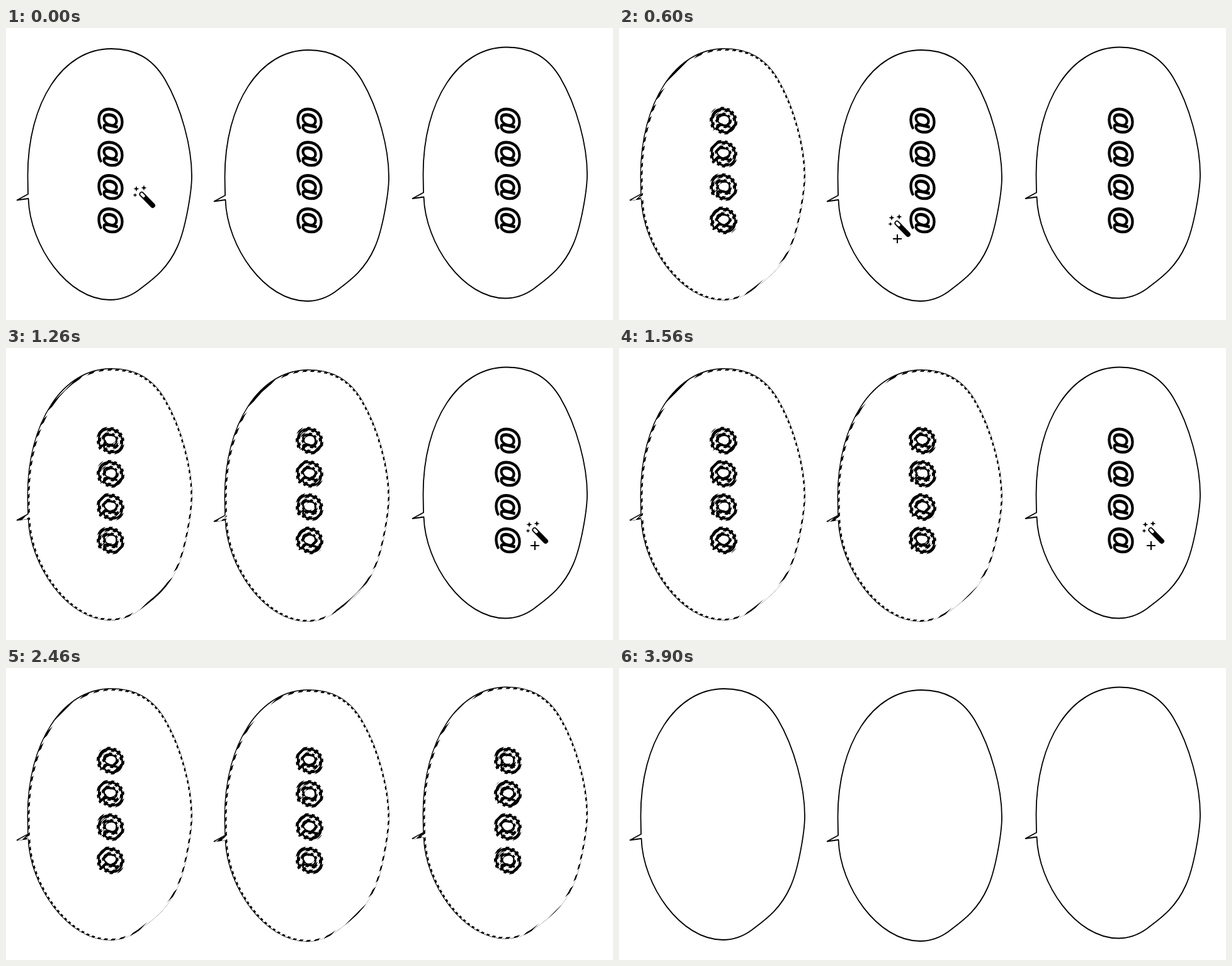
Recreate the animation shown at these times as an HTML page with a canvas. Size 964 by 464 pixels, loop 3.96 s.

```html
<!DOCTYPE html>
<html lang="en">
<head>
<meta charset="utf-8">
<title>Magic wand selection</title>
<style>
html, body { margin: 0; width: 100%; height: 100%; overflow: hidden; background: #fff; }
canvas { display: block; width: 964px; height: 464px; }
</style>
</head>
<body>
<canvas id="stage" width="964" height="464"></canvas>
<script>
const ctx = document.getElementById('stage').getContext('2d');
const LOOP = 3960, STEP = 60;
const FREEZE = 2880, DESELECT = 3060, CLEAR = 3300;
const PERIOD = 12, SPEED = 1.5, PHASE = 4;

const outline = new Path2D('M35 264L34.5 235C34.5 118 90 33 167 33' +
  'C205 33 232 48 252 81C279 127 295 190 295 235C295 260 285 320 272 348' +
  'C256 384 232 400 210 417C196 427 182 432 165 432' +
  'C98 432 38 346 35.5 271L17.5 273.5Z');

// Offset of each bubble and the time it gets selected
const bubbles = [
  { x: 0, y: 0, select: 240 },
  { x: 313, y: 2, select: 1200 },
  { x: 628, y: -2.5, select: 1740 }
];

// Wand stops; power shapes the ease-out towards the next stop
const selecting = [
  { t: 0, x: 202, y: 250, power: 1 },
  { t: 600, x: 428, y: 296, power: 1 },
  { t: 960, x: 519, y: 286, power: 6 },
  { t: 1560, x: 831, y: 275, power: 1 },
  { t: 1980, x: 897, y: 268 }
];
const leaving = [
  { t: 3180, x: 470, y: 406, power: 1 },
  { t: 3480, x: 606, y: 319, power: 1 },
  { t: 3720, x: 606, y: 319, power: 1 },
  { t: 3900, x: 857, y: 245 }
];

function makeStripes() {
  const tile = document.createElement('canvas');
  tile.width = tile.height = PERIOD;
  const c = tile.getContext('2d');
  for (let y = 0; y < PERIOD; y++) {
    for (let x = 0; x < PERIOD; x++) {
      c.fillStyle = (x + y + PHASE) % PERIOD < PERIOD / 2 ? '#000' : '#fff';
      c.fillRect(x, y, 1, 1);
    }
  }
  return ctx.createPattern(tile, 'repeat');
}
const ants = makeStripes();

// The stripes stay fixed to the stage while shapes are moved
function useAnts(step) {
  const shift = Math.round(step * SPEED) % PERIOD;
  ants.setTransform(ctx.getTransform().inverse().translate(shift, 0));
  ctx.strokeStyle = ants;
}

function drawBubble(b, selected, step) {
  ctx.save();
  ctx.translate(b.x, b.y);
  ctx.lineJoin = 'round';
  ctx.strokeStyle = '#000';
  ctx.lineWidth = 1.8;
  ctx.stroke(outline);
  if (selected) {
    ctx.translate(0.7, 0.5);
    ctx.clip(outline);
    useAnts(step);
    ctx.lineWidth = 4.4;
    ctx.stroke(outline);
  }
  ctx.restore();
}

// A vertical-writing sign: the glyph lies on its side, centred on x, y
function drawSign(x, y, selected, step) {
  ctx.save();
  ctx.translate(x, y);
  ctx.save();
  if (selected) {
    const ring = new Path2D();
    ring.rect(-40, -40, 80, 80);
    ring.ellipse(0.5, -1, 8, 6, -0.2, 0, Math.PI * 2);
    ctx.clip(ring, 'evenodd');
  }
  ctx.rotate(Math.PI / 2);
  ctx.font = '47px "Liberation Sans", Arial, sans-serif';
  ctx.lineJoin = 'round';
  const m = ctx.measureText('@');
  const gx = (m.actualBoundingBoxLeft - m.actualBoundingBoxRight) / 2;
  const gy = (m.actualBoundingBoxAscent - m.actualBoundingBoxDescent) / 2;
  ctx.strokeStyle = ctx.fillStyle = '#000';
  if (selected) useAnts(step);
  ctx.lineWidth = selected ? 4 : 1.4;
  ctx.strokeText('@', gx, gy);
  ctx.fillText('@', gx, gy);
  ctx.restore();
  ctx.restore();
}

function star(x, y, r) {
  ctx.beginPath();
  for (let i = 0; i < 8; i++) {
    const a = i * Math.PI / 4, d = i % 2 ? r * 0.36 : r;
    ctx.lineTo(x + d * Math.cos(a), y + d * Math.sin(a));
  }
  ctx.fill();
}

function line(x1, y1, x2, y2, color, width) {
  ctx.strokeStyle = color;
  ctx.lineWidth = width;
  ctx.beginPath();
  ctx.moveTo(x1, y1);
  ctx.lineTo(x2, y2);
  ctx.stroke();
}

function drawWand({ x, y }, cross) {
  ctx.save();
  ctx.translate(Math.round(x), Math.round(y));
  ctx.fillStyle = '#000';
  star(5, 5.5, 4.5);
  star(17, 4, 4.5);
  star(3, 15.5, 3.5);
  ctx.lineCap = 'round';
  line(13.5, 14, 31, 32, '#000', 8);
  line(13.5, 14, 16.5, 17, '#fff', 4.5);
  ctx.lineCap = 'butt';
  if (cross) {
    line(7, 39, 21, 39, '#000', 2);
    line(14, 32, 14, 46, '#000', 2);
  }
  ctx.restore();
}

function along(stops, t) {
  const i = stops.findIndex(s => s.t > t);
  if (i < 1) return null;
  const a = stops[i - 1], b = stops[i];
  const k = 1 - (1 - (t - a.t) / (b.t - a.t)) ** a.power;
  return { x: a.x + (b.x - a.x) * k, y: a.y + (b.y - a.y) * k };
}

function draw(time) {
  const t = Math.floor((time % LOOP) / STEP) * STEP;
  const step = Math.min(t, FREEZE) / STEP;
  ctx.fillStyle = '#fff';
  ctx.fillRect(0, 0, 964, 464);
  bubbles.forEach((b, col) => {
    const selected = t >= b.select && t < DESELECT;
    drawBubble(b, selected, step);
    for (let row = 0; row < 4 && t < CLEAR; row++) {
      drawSign(166 + 315.5 * col, 147 + 52.8 * row, selected, step);
    }
  });
  const wand = along(selecting, t) || along(leaving, t);
  if (wand) drawWand(wand, t > 0);
}

const start = performance.now();
function tick() {
  draw(performance.now() - start);
  requestAnimationFrame(tick);
}
tick();
</script>
</body>
</html>
```
